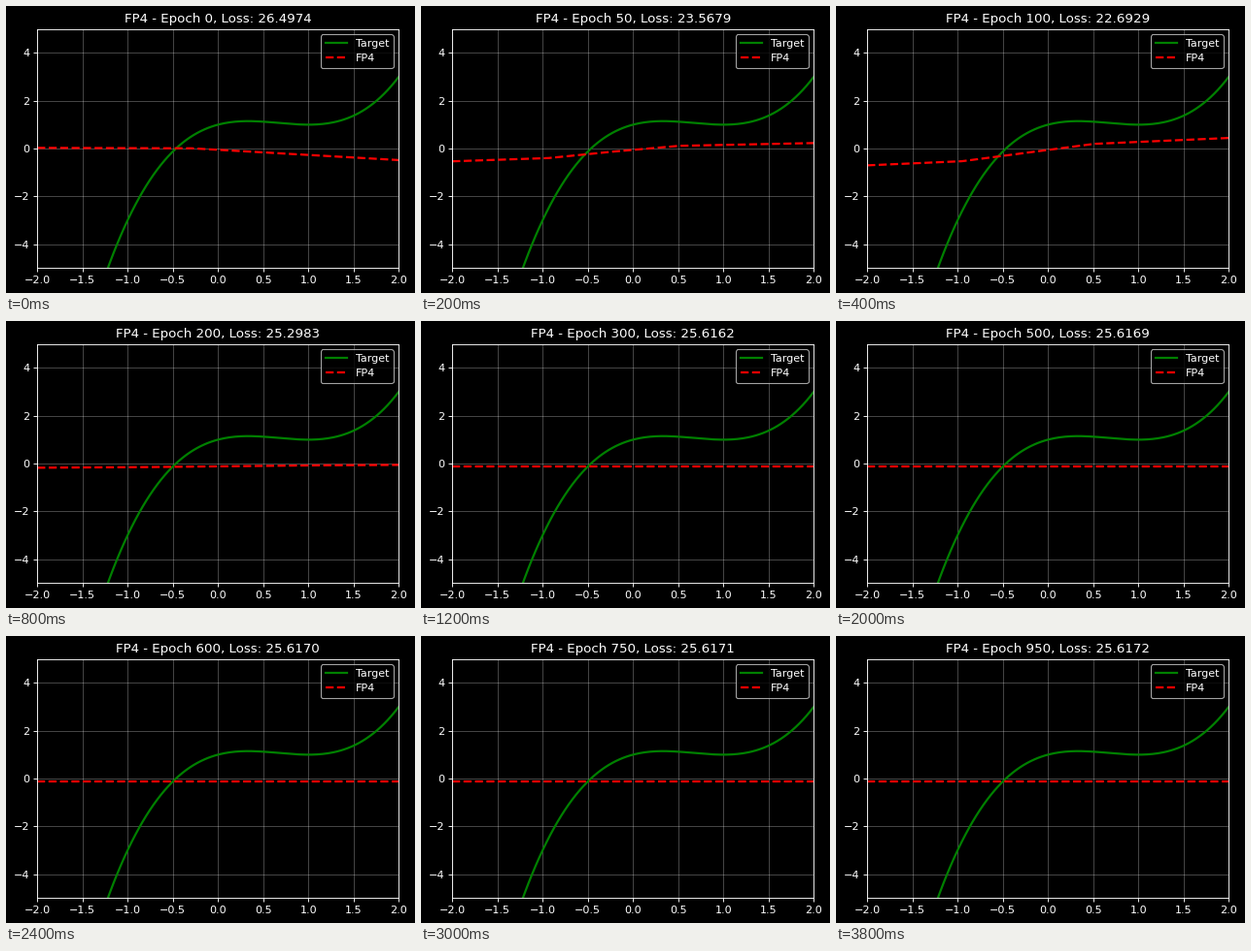
Write a matplotlib script that moves like this. It is 421 by 296 pixels and loops after 4 s.

```python
import numpy as np
import matplotlib.pyplot as plt
from matplotlib.animation import FuncAnimation

W, H, DPI = 421, 296, 80
FRAMES, STEP, INTERVAL = 20, 50, 200
SETTLED = 300  # epoch from which the fit stays flat

x = np.linspace(-2, 2, 200)
target = x**3 - 2 * x**2 + x + 1


def bend(x0, y0, slope, extra, width):
    """A line through (x0, y0) that is steeper by extra for a width after x0."""
    return y0 + slope * (x - x0) + extra * np.clip(x - x0, 0, width)


# Fit and loss at the main stages: start, best, fading, flat
FITS = [
    bend(-0.3, 0.012, -0.01, -0.205, 2.3),
    bend(-0.95, -0.53, 0.165, 0.335, 1.45),
    bend(-0.95, -0.155, 0.019, 0.022, 1.9),
    bend(0, -0.107, 0, 0, 0),
]
LOSSES = [26.4974, 22.6929, 25.2983, 25.6162]


def stage_at(epoch):
    # Learns fast at first, then drifts evenly towards the flat line
    return np.interp(epoch, [0, 50, 100, SETTLED], [0, 0.77, 1, 3])


def fit_at(epoch):
    stage = stage_at(epoch)
    k = min(int(stage), len(FITS) - 2)
    return FITS[k] + (stage - k) * (FITS[k + 1] - FITS[k])


def loss_at(epoch):
    settling = 0.001 * (1 - np.exp(-max(epoch - SETTLED, 0) / 166))
    return np.interp(stage_at(epoch), range(len(LOSSES)), LOSSES) + settling


plt.style.use("dark_background")
plt.rcParams["font.family"] = "DejaVu Sans"
fig = plt.figure(figsize=(W / DPI, H / DPI), dpi=DPI)
ax = fig.add_axes([32.2 / W, 25.78 / H, 372 / W, 246.4 / H])
ax.plot(x, target, color="green", lw=2, label="Target")
fit, = ax.plot([], [], color="red", ls="--", lw=2, label="FP4")
ax.set_xlim(-2, 2)
ax.set_ylim(-5, 5)
ax.grid(alpha=0.3)
ax.legend(loc="upper right")
title = ax.set_title("")


def update(i):
    epoch = i * STEP
    fit.set_data(x, fit_at(epoch))
    title.set_text(f"FP4 - Epoch {epoch}, Loss: {loss_at(epoch):.4f}")
    return fit, title


anim = FuncAnimation(fig, update, frames=FRAMES, interval=INTERVAL,
                     repeat=True, repeat_delay=0)
plt.show()
```
